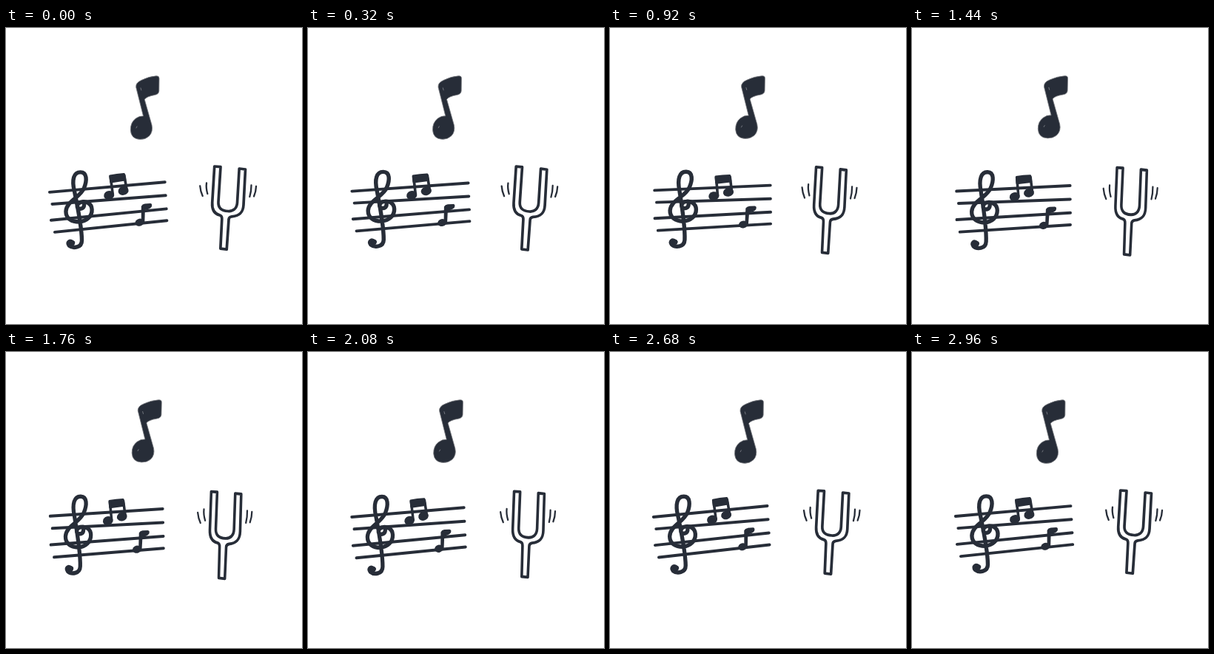
An HTML page without scripts that plays this animation: 400x400 px, repeating every 3000 ms.

```html
<!DOCTYPE html>
<html lang="en">
<head>
<meta charset="utf-8">
<title>Music doodles</title>
<style>
  html, body { margin: 0; width: 100%; height: 100%; overflow: hidden; background: #fff; }
  svg { display: block; width: 100%; height: 100%; }
  .ink { fill: #272d38; }
  .line { fill: none; stroke: #272d38; stroke-linecap: round; stroke-linejoin: round; }

  /* Each doodle swings between two poses; the delays shift the phases. */
  .sway {
    animation: move, turn, stretch;
    animation-duration: 1.5s;
    animation-timing-function: cubic-bezier(.37, 0, .63, 1);
    animation-iteration-count: infinite;
    animation-direction: alternate;
  }
  @keyframes move { from { translate: var(--move-a, 0px 0px); } to { translate: var(--move-b); } }
  @keyframes turn { from { rotate: var(--turn-a, 0deg); } to { rotate: var(--turn-b); } }
  @keyframes stretch { from { scale: var(--size-a, 1 1); } to { scale: var(--size-b); } }

  .note {
    transform-origin: 187px 108px;
    --move-b: 2.7px -.9px; --turn-b: .6deg; --size-b: 1.02 .985;
  }
  .staff {
    transform-origin: 61px 249px;
    --move-a: .5px -2.5px; --move-b: .3px 1.9px;
    --turn-a: -.35deg; --turn-b: 2.75deg;
    --size-a: 1.012 .996; --size-b: .975 1.028;
    animation-delay: -2.19s, -.36s, -2.52s;
  }
  .fork {
    transform-origin: 302.5px 188.5px;
    --move-b: -5.4px 1.4px;
    --turn-a: .3deg; --turn-b: -1.2deg;
    --size-b: .963 1.056;
    animation-delay: 0s, -2.55s, 0s;
  }
</style>
</head>
<body>
<svg viewBox="0 0 400 400">
  <defs>
    <ellipse id="head" class="ink" rx="7.1" ry="5.8" transform="rotate(-15)"/>
  </defs>

  <g class="note sway">
    <path class="ink" stroke="#77797e" stroke-width=".8" d="M175.7 80Q175 74 183 70.5Q193 65.5 203 64.8Q207 64.5 207 68L206.8 85Q206.5 89.5 201 90.5Q190 92.5 187.2 96.5L197 131Q199 140 193.5 146Q188 151 181 150.5Q169 150 168.3 138Q168 128 175 122.5Q180 118.5 185.5 119Z"/>
    <path class="line" style="stroke:#878a91" stroke-width=".8" d="M182 81l.8 3M177 133l-1 2"/>
  </g>

  <g class="staff sway">
    <path class="line" stroke-width="3.9" d="M58.5 222L213.8 208.2M62 238L214.8 226.2M60.5 259.7L215.8 244.2M65.5 275.8L216.5 260"/>
    <!-- treble clef -->
    <path class="line" stroke-width="5.4" d="M90 290C85 286 82 290 85 294C90 298 102 297 102 287C102 270 97 245 92 221C88 205 91 195 100 195C109 195 109 206 105 216C100 229 81 234 80.5 248C80.5 258 89 262 98 262C109 261 116 254 115.5 245C115 237 108 234 102 235C95 236 94 243 98 244C102 245 105 243 105 239"/>
    <circle class="ink" cx="89" cy="290.5" r="3.6"/>
    <!-- beamed pair -->
    <path class="line" stroke-width="3" style="fill:#272d38" d="M140 200Q149 198 158.500 197.500L160 205L141 208Z"/>
    <path class="line" stroke-width="3.6" d="M140.500 201L143.600 225M159 199L162.400 219"/>
    <use href="#head" x="138.500" y="226"/>
    <use href="#head" x="157.800" y="220"/>
    <!-- single note -->
    <path class="line" stroke-width="2" style="fill:#272d38" d="M183 241Q184 239 187 238.500L194 238Q196 238 195 241Q193 244 186 245L185.500 262L183 262Z"/>
    <use href="#head" transform="translate(179.700 262.500) scale(.85)"/>
  </g>

  <g class="fork sway">
    <path class="line" stroke-width="3.7" d="M281.700 187L278.700 236C278 247 283 251.500 289 253Q292 254 291.800 258L289.800 298.200L298.200 299.200L301 259Q301 255.500 305 254.800C316 254 320.500 249 321 239L323.500 191L315.200 190L312.500 236C312 244 307 248 300 247.500C291 247 286.500 243 287 235L290 187.700Z"/>
    <path class="line" stroke-width="2.3" d="M262.200 213.500Q262.800 221 265.700 227M271 209.500Q270 216 272.300 224M331.500 212.500Q331.500 221 329.300 228M338 214Q337.800 221 335 227.500"/>
  </g>
</svg>
</body>
</html>
```
